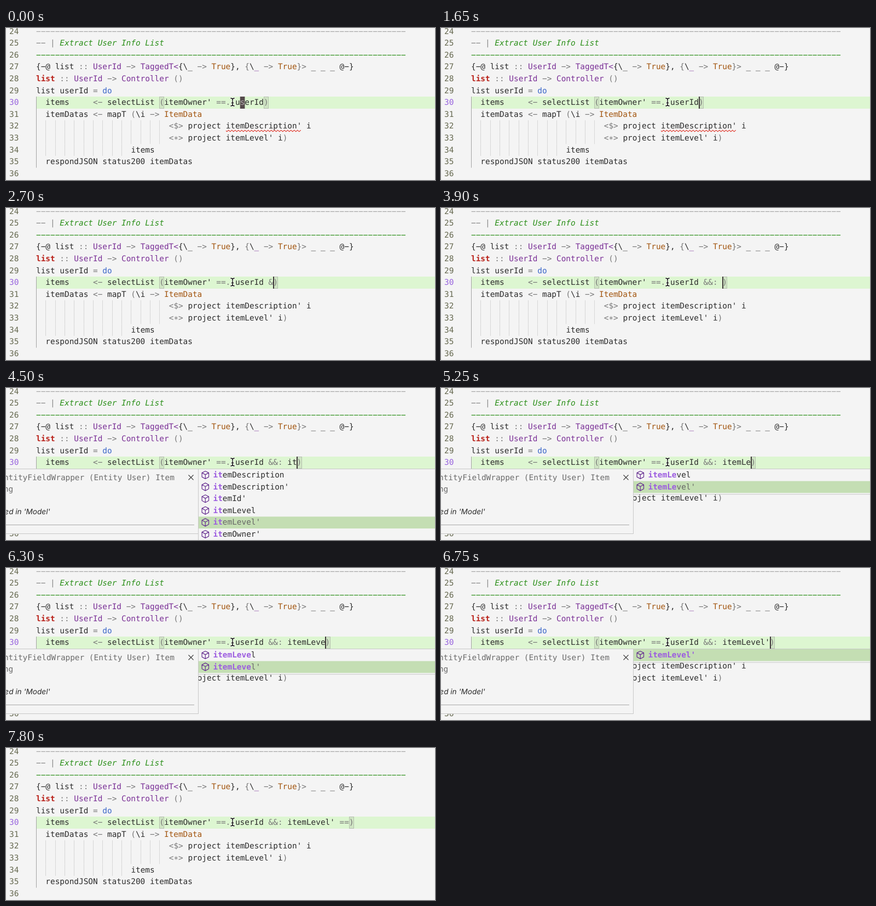
Write an HTML page that moves like this. It is 784 px wide and 277 px high and loops after 8000 ms.

```html
<!DOCTYPE html>
<html>
<head>
<meta charset="utf-8">
<style>
html, body { margin: 0; width: 100%; height: 100%; overflow: hidden; background: #f4f4f4; }
svg { display: block; width: 784px; height: 277px; }
text { font: 14.4px "DejaVu Sans Mono", monospace; white-space: pre; text-rendering: geometricPrecision; fill: #2b2b2b; }
.g { fill: #777; }
.c { fill: #a5a5a5; }
.h { fill: #858585; }
.n { fill: #2a8f18; }
.ni { fill: #2a8f18; font-style: italic; }
.p { fill: #7a3096; }
.b { fill: #a2550f; }
.k { fill: #3a66c8; }
.f { fill: #b92119; font-weight: bold; }
.w { fill: #b4b0b0; }
.d { fill: #6c6c6c; }
.num { fill: #65684f; }
.cur { fill: #9763de; }
.m { fill: #9c5ce0; font-weight: bold; }
.sel { fill: #666; }
.note { font: italic 13.6px Inter, "Liberation Sans", sans-serif; }
.guide { stroke: #d6d6d6; }
.edge { stroke: #c8c8c8; fill: #f4f4f4; }
</style>
</head>
<body>
<svg viewBox="0 0 784 277" xmlns="http://www.w3.org/2000/svg">
  <g id="code"></g>
  <g id="live"></g>
  <g id="popup"></g>
  <g id="mouse" fill="none" stroke-linecap="round"></g>
</svg>
<script>
const LOOP = 8000, CW = 8.669, LH = 21.6, LEFT = 55, FIRST = 30;
const $ = id => document.getElementById(id);
const colX = c => LEFT + c * CW;
const rowY = n => 125 + (n - FIRST) * LH;
const base = n => Math.floor(rowY(n) + 15.61);
const esc = s => s.replace(/&/g, '&amp;').replace(/</g, '&lt;').replace(/>/g, '&gt;');
// Wide dashes and centred stars, as the editor font draws them
const glyphs = s => s.replace(/-/g, '\u2212').replace(/\*/g, '\u2217');
const span = (cls, s) => `<tspan class="${cls}">${esc(glyphs(s))}</tspan>`;
const text = (x, y, inner, cls = '') => `<text x="${x}" y="${y}" class="${cls}">${inner}</text>`;
const rect = (x, y, w, h, fill) => `<rect x="${x}" y="${y}" width="${w}" height="${h}" fill="${fill}"/>`;
const line = (x1, y1, x2, y2, attrs) => `<line x1="${x1}" y1="${y1}" x2="${x2}" y2="${y2}" ${attrs}/>`;
const tokens = list => list.map(([c, s]) => span(c, s)).join('');
const rule = '-'.repeat(78);

// Line number: start column, then [class, text] tokens
const rows = {
  24: [0, ['c', rule]],
  25: [0, ['h', '-- | '], ['ni', 'Extract User Info List']],
  26: [0, ['n', rule]],
  27: [0, ['', '{-@ list '], ['g', ':: '], ['p', 'UserId '], ['g', '-> '], ['p', 'TaggedT<'], ['', '{\\_ '],
    ['g', '-> '], ['b', 'True'], ['', '}, '], ['g', '{'], ['', '\\'], ['p', '_ '], ['g', '-> '], ['b', 'True'],
    ['g', '}> '], ['', '_ _ _ @-}']],
  28: [0, ['f', 'list'], ['g', ' :: '], ['p', 'UserId '], ['g', '-> '], ['p', 'Controller '], ['g', '()']],
  29: [0, ['', 'list userId '], ['g', '= '], ['k', 'do']],
  31: [2, ['', 'itemDatas '], ['g', '<- '], ['', 'mapT '], ['g', '('], ['', '\\i '], ['g', '-> '], ['b', 'ItemData']],
  32: [28, ['g', '<$> '], ['', "project itemDescription' i"]],
  33: [28, ['g', '<*> '], ['', "project itemLevel' i"], ['g', ')']],
  34: [20, ['', 'items']],
  35: [2, ['', 'respondJSON status200 itemDatas']]
};

const keys = [
  [2100, ' '], [2700, '&'], [2850, '&'], [3600, ':'], [3900, ' '],
  [4200, 'i'], [4500, 't'], [4650, 'e'], [4800, 'm'], [5100, 'L'], [5250, 'e'],
  [5550, 'v'], [6300, 'e'], [6450, 'l'], [6750, "'"], [7050, ' '], [7200, '='], [7350, '=']
];
const blockMoves = [150, 300, 600, 750, 900];
const barOff = [[1350, 1650], [2550, 2700], [3300, 3600], [6000, 6300], [7800, 8000]];
const INSERT = 1350, SQUIGGLE_END = 2250, OPEN = 4200, CLOSE = 7050;
const names = ['itemDescription', "itemDescription'", "itemId'", 'itemLevel', "itemLevel'", "itemOwner'"];
const within = (t, [a, b]) => t >= a && t < b;

function drawCode() {
  let s = rect(LEFT, 125, 784 - LEFT, 22, '#ddf6d1');
  s += line(55.5, 125, 55.5, rowY(36), 'stroke="#a3a3a3"');
  for (const [n, indent] of [[32, 28], [33, 28], [34, 20]])
    for (let c = 2; c < indent; c += 2) {
      const x = Math.round(colX(c)) + .5;
      s += line(x, rowY(n), x, rowY(n + 1), 'class="guide"');
    }
  for (let n = 24; n <= 36; n++) {
    s += text(6, base(n), n, n === 30 ? 'cur' : 'num');
    if (rows[n]) s += text(colX(rows[n][0]), base(n), tokens(rows[n].slice(1)));
  }
  $('code').innerHTML = s;
}

function drawMouse() {
  const d = 'M410.8 128 Q414 128 414 130.5 Q414 128 417.2 128 M414 130.5 V139.5 M410.8 142 Q414 142 414 139.5 Q414 142 417.2 142 M412.4 136.5 H415.6';
  $('mouse').innerHTML = `<path d="${d}" stroke="#fff" stroke-width="3"/><path d="${d}" stroke="#111" stroke-width="1.4"/>`;
}

function bracketBox(col) {
  return `<rect x="${Math.round(colX(col)) + .5}" y="125.5" width="8" height="21" fill="#d0e6c4" stroke="#b5c0ae"/>`;
}

function squiggle() {
  let d = 'M402 187.2';
  for (let i = 0; i < 46; i++) d += `L${403.75 + i * 3} ${i % 2 ? 186.2 : 188.8}`;
  return `<path d="${d}" fill="none" stroke="#e0281c" stroke-width="1.1"/>`;
}

function drawLive(t, typed) {
  const end = 48 + typed.length;
  const tail = typed.split(/([&:=]+)/).map((s, i) => span(i % 2 ? 'g' : '', s)).join('');
  let s = bracketBox(26) + bracketBox(end);
  s += text(colX(2), base(30), tokens([['', 'items     '], ['g', '<- '], ['', 'selectList '], ['g', '('],
    ['', "itemOwner' "], ['g', '==. '], ['', 'userId']]) + tail + span('g', ')'));
  if (t < INSERT) {
    const i = 1 + blockMoves.filter(m => t >= m).length;
    s += rect(colX(42 + i), 125, CW, 22, '#54494b') + text(colX(42 + i), base(30), 'userId)'[i], 'w');
  } else if (!barOff.some(r => within(t, r))) {
    s += rect(Math.floor(colX(end)), 125, 2, 22, '#3f393a');
  }
  if (t < SQUIGGLE_END) s += squiggle();
  $('live').innerHTML = s;
}

function cube(y) {
  return `<path transform="translate(364.3 ${y})" d="M0 -7 L6.2 -3.9 V3.6 L0 7 L-6.2 3.6 V-3.9 Z M-6.2 -3.9 L0 -.6 L6.2 -3.9 M0 -.6 V7" fill="none" stroke="#652d90" stroke-width="1.2" stroke-linejoin="round"/>`;
}

function docs() {
  return '<rect class="edge" x="-5.5" y="147.5" width="357" height="118"/>'
    + text(308 - 37 * CW, 168, 'EntityFieldWrapper (Entity User) Item', 'd')
    + text(13.2 - 2 * CW, 189, 'ng', 'd')
    + '<text x="80.5" y="230" text-anchor="end" class="note">Defined in \'Model\'</text>'
    + line(0, 249.5, 344, 249.5, 'stroke="#a9a9a9"')
    + '<path d="M333.5 158.5 L342.5 167.5 M342.5 158.5 L333.5 167.5" stroke="#424242" stroke-width="1.2"/>';
}

function drawPopup(t, typed) {
  if (!within(t, [OPEN, CLOSE])) { $('popup').innerHTML = ''; return; }
  const word = typed.split(' ').pop();
  const list = names.filter(n => n.startsWith(word));
  const exact = word === 'itemLevel';
  const pick = exact ? word : "itemLevel'";
  let s = `<rect class="edge" x="351.5" y="147.5" width="440" height="${list.length * LH + 3}"/>`;
  list.forEach((name, i) => {
    const y = 148 + i * LH, on = name === pick;
    if (on) s += rect(352, y, 432, LH, '#c4deb3');
    s += cube(y + 10.5);
    s += text(378.5, Math.floor(y + 15.5), span('m', word) + span(on ? 'sel' : '', name.slice(word.length)));
  });
  $('popup').innerHTML = exact ? s : s + docs();
}

const marks = [...new Set([...keys.map(k => k[0]), ...blockMoves, ...barOff.flat(), INSERT, SQUIGGLE_END])];
let shown = -1;
function render(t) {
  const stage = marks.filter(m => t >= m).length;
  if (stage === shown) return;
  shown = stage;
  const typed = keys.filter(k => t >= k[0]).map(k => k[1]).join('');
  drawLive(t, typed);
  drawPopup(t, typed);
}

drawCode();
drawMouse();
const start = performance.now();
function tick() {
  render((performance.now() - start) % LOOP);
  requestAnimationFrame(tick);
}
tick();
</script>
</body>
</html>
```
